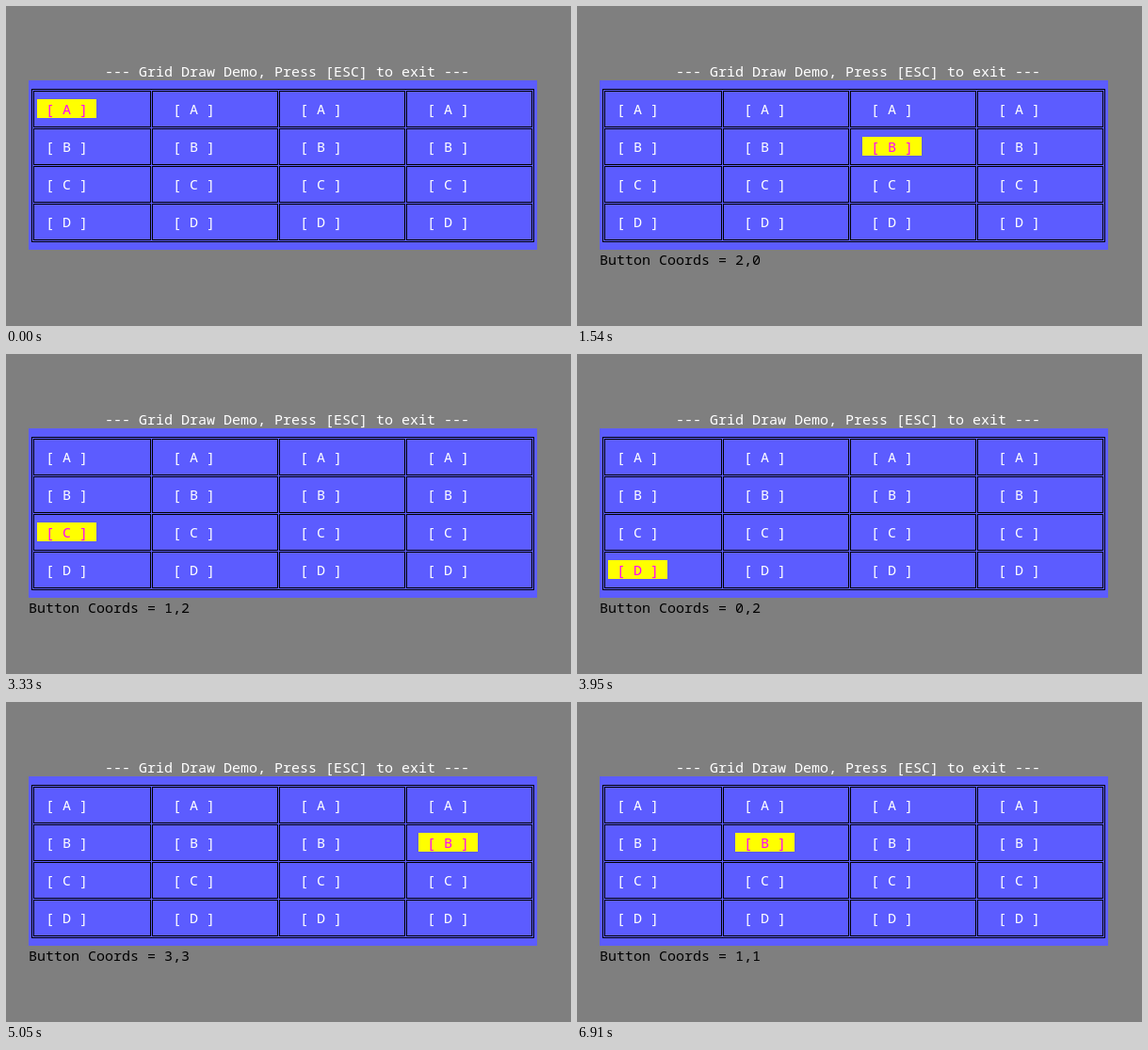
An HTML page that plays this animation: 600x340 px, repeating every 8850 ms.

```html
<!DOCTYPE html>
<html lang="en">
<head>
<meta charset="utf-8">
<title>Grid Draw Demo</title>
<style>
  html, body { margin: 0; width: 100%; height: 100%; overflow: hidden; background: #7f7f7f; }
  svg { display: block; }
  text { font: 15px "Noto Sans Mono", "Liberation Mono", monospace; fill: #fff; white-space: pre; }
  .line { fill: none; stroke: #000; shape-rendering: crispEdges; }
  .active { fill: #f0f; }
  #status { fill: #000; }
</style>
</head>
<body>
<svg id="stage" width="600" height="340" viewBox="0 0 600 340"></svg>
<script>
const LOOP = 8850;
const CHAR_W = 9, CHAR_H = 20, BASELINE = 16, LEFT = 24, TOP = 79;
const SIZE = 4, COL_W = 15 * CHAR_W, ROW_H = 2 * CHAR_H;

// the keys typed by the user and when: arrows move, enter reports the cell
const KEYS = [
  ["right", 380], ["right", 700], ["enter", 1240], ["down", 1540], ["down", 1770],
  ["enter", 2080], ["left", 2630], ["enter", 2950], ["left", 3330], ["enter", 3650],
  ["down", 3950], ["right", 4200], ["right", 4270], ["right", 4420], ["enter", 4670],
  ["up", 4900], ["up", 5050], ["up", 5600], ["enter", 5830], ["left", 6210],
  ["left", 6380], ["down", 6610], ["enter", 6910]
];

const stage = document.getElementById("stage");

function add(tag, attrs, content = "") {
  const el = document.createElementNS("http://www.w3.org/2000/svg", tag);
  for (const key in attrs) el.setAttribute(key, attrs[key]);
  el.textContent = content;
  return stage.appendChild(el);
}

const write = (x, top, content) => add("text", { x, y: top + BASELINE }, content);
const box = (width, height, fill) => add("rect", { x: LEFT, y: TOP, width, height, fill });
const outline = (x1, y1, x2, y2) => add("rect", {
  class: "line", x: x1 + 0.5, y: y1 + 0.5, width: x2 - x1, height: y2 - y1
});

// centres of the double lines; the first column is one character narrower
const lineX = col => LEFT - 5 + col * COL_W + (col ? 0 : CHAR_W);
const lineY = row => TOP + CHAR_H / 2 + row * ROW_H;
const buttonX = col => LEFT + CHAR_W + col * COL_W;
const buttonY = row => TOP + CHAR_H + row * ROW_H;

write(LEFT + 9 * CHAR_W, TOP - CHAR_H, "--- Grid Draw Demo, Press [ESC] to exit ---");
box(60 * CHAR_W, 9 * CHAR_H, "#5c5cff");
outline(lineX(0) - 1, lineY(0) - 1, lineX(SIZE) + 1, lineY(SIZE) + 1);
const highlight = box(7 * CHAR_W, CHAR_H, "#ff0");

const buttons = Array.from({ length: SIZE * SIZE }, (_, i) => {
  const col = i % SIZE, row = Math.floor(i / SIZE);
  outline(lineX(col) + 1, lineY(row) + 1, lineX(col + 1) - 1, lineY(row + 1) - 1);
  return write(buttonX(col) + CHAR_W, buttonY(row), `[ ${"ABCD"[row]} ]`);
});
const status = write(LEFT, TOP + 9 * CHAR_H, "");
status.id = "status";

function stateAt(t) {
  let col = 0, row = 0, message = "";
  for (const [key, time] of KEYS) {
    if (time > t) break;
    if (key === "right") col++;
    if (key === "left") col--;
    if (key === "down") row++;
    if (key === "up") row--;
    if (key === "enter") message = `Button Coords = ${col},${row}`;
  }
  return { col, row, message };
}

function render(t) {
  const { col, row, message } = stateAt(t);
  highlight.setAttribute("x", buttonX(col));
  highlight.setAttribute("y", buttonY(row));
  buttons.forEach((button, i) => button.classList.toggle("active", i === row * SIZE + col));
  status.textContent = message;
}

function tick() {
  render(performance.now() % LOOP);
  requestAnimationFrame(tick);
}
tick();
</script>
</body>
</html>
```
